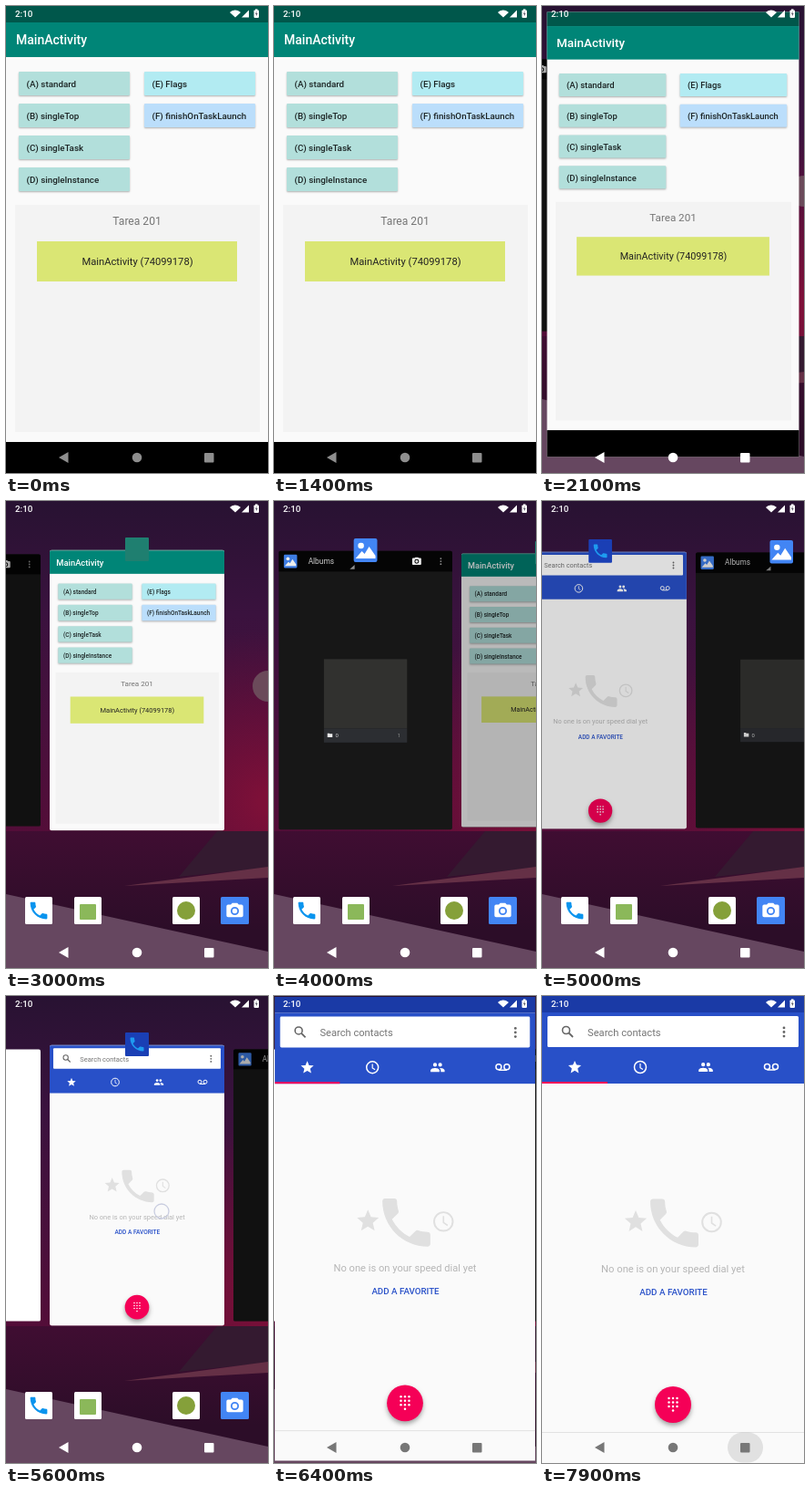
These frames come from a looping animation (288 px wide and 512 px high, 8 s). An HTML page with a canvas:

```html
<!DOCTYPE html>
<html lang="en">
<head>
<meta charset="utf-8">
<title>Recent apps</title>
<style>
html, body { margin: 0; width: 100%; height: 100%; overflow: hidden; background: #000 }
canvas { display: block; width: 100vw; height: 100vh }
</style>
</head>
<body>
<canvas id="stage" width="288" height="512"></canvas>
<script>
const LOOP = 8000, PAGE = 202;
const c = document.getElementById('stage').getContext('2d');

// 24-unit pictograms
const HANDSET = new Path2D('M6.62 10.79c1.44 2.83 3.76 5.14 6.59 6.59l2.2-2.2c.27-.27.67-.36 1.02-.24 1.12.37 2.33.57 3.57.57.55 0 1 .45 1 1V20c0 .55-.45 1-1 1-9.39 0-17-7.61-17-17 0-.55.45-1 1-1h3.5c.55 0 1 .45 1 1 0 1.25.2 2.45.57 3.57.11.35.03.74-.25 1.02z');
const STAR = new Path2D('M12 17.27L18.18 21l-1.64-7.03L22 9.24l-7.19-.61L12 2 9.19 8.63 2 9.24l5.46 4.73L5.82 21z');
const PEOPLE = new Path2D('M16 11a3 3 0 1 0 0-6 3 3 0 0 0 0 6zM8 11a3 3 0 1 0 0-6 3 3 0 0 0 0 6zM8 13c-2.33 0-7 1.17-7 3.5V19h14v-2.5C15 14.17 10.33 13 8 13zM16 13l-1 .05c1.2.84 2 1.97 2 3.45V19h6v-2.5c0-2.33-4.67-3.5-7-3.5z');
const CAMERA = new Path2D('M9 3L7.2 5H4a2 2 0 0 0-2 2v11a2 2 0 0 0 2 2h16a2 2 0 0 0 2-2V7a2 2 0 0 0-2-2h-3.2L15 3zM12 7.5a5 5 0 1 1 0 10 5 5 0 0 1 0-10zM12 9.5a3 3 0 1 0 0 6 3 3 0 0 0 0-6z');
const FOLDER = new Path2D('M10 4H2v16h20V6H12z');

const clamp = v => Math.max(0, Math.min(1, v));
const span = (t, from, len) => clamp((t - from) / len);
const smooth = v => v * v * (3 - 2 * v);
const inOut = v => v < .5 ? 4 * v ** 3 : 1 - 4 * (1 - v) ** 3;

function rect(x, y, w, h, color) {
  c.fillStyle = color;
  c.fillRect(x, y, w, h);
}
function round(x, y, w, h, r, color) {
  c.fillStyle = color;
  c.beginPath();
  c.roundRect(x, y, w, h, r);
  c.fill();
}
function dot(x, y, r, color) {
  c.fillStyle = color;
  c.beginPath();
  c.arc(x, y, r, 0, 7);
  c.fill();
}
function ring(x, y, r, width, color) {
  c.strokeStyle = color;
  c.lineWidth = width;
  c.beginPath();
  c.arc(x, y, r, 0, 7);
  c.stroke();
}
function poly(color, ...p) {
  c.fillStyle = color;
  c.beginPath();
  for (let i = 0; i < p.length; i += 2) c.lineTo(p[i], p[i + 1]);
  c.fill();
}
function line(width, color, ...p) {
  c.strokeStyle = color;
  c.lineWidth = width;
  c.beginPath();
  for (let i = 0; i < p.length; i += 2) c.lineTo(p[i], p[i + 1]);
  c.stroke();
}
function text(s, x, y, size, color, weight = 400, align = 'left') {
  c.font = `${weight} ${size}px Roboto, sans-serif`;
  c.textAlign = align;
  c.fillStyle = color;
  c.fillText(s, x, y);
}
function icon(path, x, y, size, color) {
  c.save();
  c.translate(x - size / 2, y - size / 2);
  c.scale(size / 24, size / 24);
  c.fillStyle = color;
  c.fill(path, path === CAMERA ? 'evenodd' : 'nonzero');
  c.restore();
}
function shadow(color, blur, dy) {
  c.shadowColor = color;
  c.shadowBlur = blur;
  c.shadowOffsetY = dy;
}
function clock(x, y, r, width, color) {
  ring(x, y, r, width, color);
  line(width * .8, color, x, y - r * .6, x, y + r * .1, x + r * .45, y + r * .4);
}
function menuDots(x, y, color) {
  for (let i = -1; i < 2; i++) dot(x, y + i * 4.6, 1.4, color);
}
function picture(x, y, s) {
  c.save();
  c.translate(x, y);
  c.scale(s / 26, s / 26);
  round(-13, -13, 26, 26, 2, '#4285f4');
  dot(-5, -5, 3.3, '#fff');
  poly('#fff', -11, 9, -4, 1, -1, 4, 4, -4, 11, 6, 11, 9);
  c.restore();
}

function mainScreen() {
  rect(0, 0, 288, 512, '#fafafa');
  rect(0, 0, 288, 18, '#00574b');
  rect(0, 18, 288, 38, '#008577');
  text('MainActivity', 11, 42, 14, '#fff', 500);
  const labels = ['(A) standard', '(B) singleTop', '(C) singleTask', '(D) singleInstance', '(E) Flags', '(F) finishOnTaskLaunch'];
  labels.forEach((label, i) => {
    const x = i < 4 ? 14 : 152, y = 72 + i % 4 * 35;
    c.save();
    shadow('rgba(0,0,0,.3)', 2, 1);
    round(x, y, 122, 26, 1, i < 4 ? '#b2dfdb' : i < 5 ? '#b2ebf2' : '#bbdefb');
    c.restore();
    text(label, x + 8.5, y + 17, 9.8, '#1c2424', 500);
  });
  rect(10, 218, 269, 249, '#f3f3f3');
  text('Tarea 201', 144, 240, 12.1, '#757575', 400, 'center');
  rect(34, 258, 220, 44, '#dae674');
  text('MainActivity (74099178)', 144.5, 284, 11.2, '#222', 400, 'center');
  rect(0, 478, 288, 34, '#000');
}

function galleryScreen() {
  rect(0, 0, 288, 512, '#191919');
  rect(0, 0, 288, 51, '#050505');
  picture(19.5, 34, 22);
  text('Albums', 49, 38, 12.6, '#ddd');
  poly('#999', 126, 40, 126, 47, 118, 47);
  icon(CAMERA, 229, 34, 18, '#fff');
  menuDots(269, 34, '#999');
  rect(75, 196, 138, 115, '#353533');
  rect(75, 311, 138, 23, '#2f3136');
  icon(FOLDER, 85, 322, 10, '#fff');
  text('0', 94, 326, 9, '#ddd');
  text('1', 197, 326, 9, '#999');
}

function dialerScreen(p) {
  rect(0, 0, 288, 512, '#fafafa');
  rect(0, 0, 288, 18, '#1a3aa6');
  rect(0, 18, 288, 78, '#2850c8');
  round(6, 22, 276, 34, 1.5, '#fff');
  ring(26.5, 37.5, 4, 1.6, '#666');
  line(1.8, '#666', 29.5, 40.5, 34, 45);
  text('Search contacts', 50, 43.5, 11.2, '#757575');
  menuDots(266, 39.5, '#666');
  icon(STAR, 36, 78, 17, '#fff');
  clock(108, 78, 6.5, 1.5, '#fff');
  icon(PEOPLE, 180, 78, 17, '#fff');
  ring(247.5, 77.5, 3, 1.5, '#fff');
  ring(256.5, 77.5, 3, 1.5, '#fff');
  line(1.5, '#fff', 247.5, 81, 256.5, 81);
  c.globalAlpha = 1 - p;
  rect(0, 94, 72, 2, '#f50057');
  c.globalAlpha = 1;
  icon(STAR, 103, 247, 29, '#e0e0e0');
  icon(HANDSET, 145.5, 249, 70.6, '#e0e0e0');
  clock(186.5, 248, 10.3, 2, '#e0e0e0');
  text('No one is on your speed dial yet', 144, 303, 11.2, '#b6b6b6', 400, 'center');
  text('ADD A FAVORITE', 144.5, 328, 9.8, '#2850c8', 500, 'center');
  c.save();
  shadow('rgba(0,0,0,.35)', 5, 3);
  dot(144, 448, 20, '#f50057');
  c.restore();
  for (let i = 0; i < 10; i++)
    dot(i < 9 ? 139.5 + i % 3 * 4.5 : 144, 441 + Math.floor(i / 3) * 4.5, 1.25, '#fff');
  rect(0, 478, 288, 1, '#e2e2e2');
}

const blankScreen = () => rect(0, 0, 288, 512, '#fff');

function handsetBadge(x, y) {
  round(x - 13, y - 13, 26, 26, 1, '#1a3fb5');
  icon(HANDSET, x, y, 20, '#1e9bf0');
}
const cards = [
  { draw: mainScreen, badge: (x, y) => round(x - 13, y - 13, 26, 26, 1, '#1f7f70') },
  { draw: galleryScreen, badge: (x, y) => picture(x, y, 26) },
  { draw: dialerScreen, badge: handsetBadge },
  { draw: blankScreen, badge() {} }
];

function wallpaper() {
  const sky = c.createLinearGradient(0, 0, 0, 370);
  ['#281232', '#3a123e', '#48103c', '#540d38'].forEach((s, i) => sky.addColorStop(i / 3, s));
  rect(0, 0, 288, 512, sky);
  const glow = c.createRadialGradient(288, 330, 10, 288, 330, 190);
  glow.addColorStop(0, '#7d1038');
  glow.addColorStop(1, 'rgba(110,14,56,0)');
  rect(0, 0, 288, 512, glow);
  dot(288, 203, 17, '#6b4a5a');
  // layered hills
  const ground = c.createLinearGradient(0, 360, 0, 470);
  ground.addColorStop(0, '#400d32');
  ground.addColorStop(1, '#2c0d28');
  rect(0, 362, 288, 150, ground);
  poly('#341a30', 190, 412, 232, 362, 288, 362, 288, 402);
  poly('#653046', 130, 422, 288, 401, 288, 413);
  poly('#664760', 0, 431, 288, 494, 288, 512, 0, 512);
}

function dock(p) {
  c.save();
  c.globalAlpha = p;
  c.translate(0, 40 * (1 - p));
  [21, 75, 183].forEach(x => round(x, 434, 30, 30, 1.5, '#fff'));
  round(236, 434, 31, 30, 1.5, '#4285f4');
  icon(HANDSET, 36, 449, 25, '#0a94ee');
  round(81, 442, 18, 17, 1, '#8bb85a');
  dot(198, 449, 10, '#85a03a');
  icon(CAMERA, 251.5, 449, 22, '#fff');
  c.restore();
}

// p: 0 is full screen, 1 is a card in the overview
function drawCard(i, scroll, p) {
  const d = scroll - PAGE * i, far = clamp(Math.abs(d) / PAGE), k = 1 - p / 3;
  if (Math.abs(d) > 260) return;
  const px = d > 0 ? 48 + d : 240 + d, q = 1 - .03 * far;
  c.save();
  if (d) {
    c.translate(px, 208);
    c.scale(q, q);
    c.translate(-px, -208);
  }
  c.save();
  c.translate(48 * p + d, 42.5 * p);
  c.scale(k, k);
  c.beginPath();
  c.roundRect(0, 17 * p, 288, 512 - 51 * p, 3 * p);
  c.clip();
  cards[i].draw(p);
  if (i < 3 && far) rect(0, 0, 288, 512, `rgba(0,0,0,${.33 * far})`);
  c.restore();
  c.globalAlpha = clamp(p * 2 - 1);
  cards[i].badge(144 + d, 53);
  c.restore();
}

function statusBar() {
  text('2:10', 10, 12, 9.8, '#fff', 500);
  c.save();
  c.translate(0, -.6);
  c.fillStyle = '#fff';
  c.beginPath();
  c.moveTo(252, 13);
  c.arc(252, 13, 8, -Math.PI * .77, -Math.PI * .23);
  c.fill();
  poly('#fff', 259, 13, 267, 13, 267, 5);
  round(272.5, 5, 5.5, 8.5, .8, '#fff');
  rect(274, 4, 2.5, 1.5, '#fff');
  poly('#445', 275.7, 6, 274, 9.4, 275.2, 9.4, 274.8, 12, 276.6, 8.6, 275.3, 8.6);
  c.restore();
}

function navBar(color) {
  poly(color, 58, 495, 68.5, 489, 68.5, 501);
  dot(144, 495, 5.3, color);
  round(218, 490, 10.5, 10.5, 1, color);
}

function ripple(grow, rgb, alpha) {
  if (!grow || !alpha) return;
  const w = 12 + 27 * grow, h = 12 + 21 * grow;
  round(223.5 - w / 2, 495 - h / 2, w, h, h / 2, `rgba(${rgb},${alpha})`);
}

function pointer(x, y) {
  dot(x, y, 8.5, '#6c6c6c');
  dot(x, y, 6.5, '#c4c4c4');
}

function render(t) {
  const slide = span(t, 3500, 940);
  const scroll = PAGE * (1 - (1 - slide) ** 2 + smooth(span(t, 4565, 770)));
  const opening = t < 4000;
  const p = opening ? inOut(span(t, 1980, 400)) : 1 - inOut(span(t, 5980, 500));
  const active = opening ? 0 : 2;

  if (p) {
    wallpaper();
    dock(clamp(p * 2 - 1));
    cards.forEach((_, i) => { if (i !== active) drawCard(i, scroll, 1); });
  }
  drawCard(active, scroll, p);
  statusBar();

  ripple(span(t, 1700, 120), '255,255,255', .18 * (1 - span(t, 1880, 150)));
  ripple(span(t, 7750, 130), '0,0,0', .1);
  if (opening) navBar(p ? '#fff' : '#8e8e8e');
  else navBar(p > .5 ? '#fff' : '#777');

  if (t > 3450 && t < 3850) pointer(80 + scroll, 300);
  if (t > 4560 && t < 5050) pointer(scroll - 26, 312);
  if (t > 5550 && t < 5800) ring(171, 236, 8, 1.3, '#c9cde0');
}

function tick(now) {
  render(now % LOOP);
  requestAnimationFrame(tick);
}
requestAnimationFrame(tick);
</script>
</body>
</html>
```
